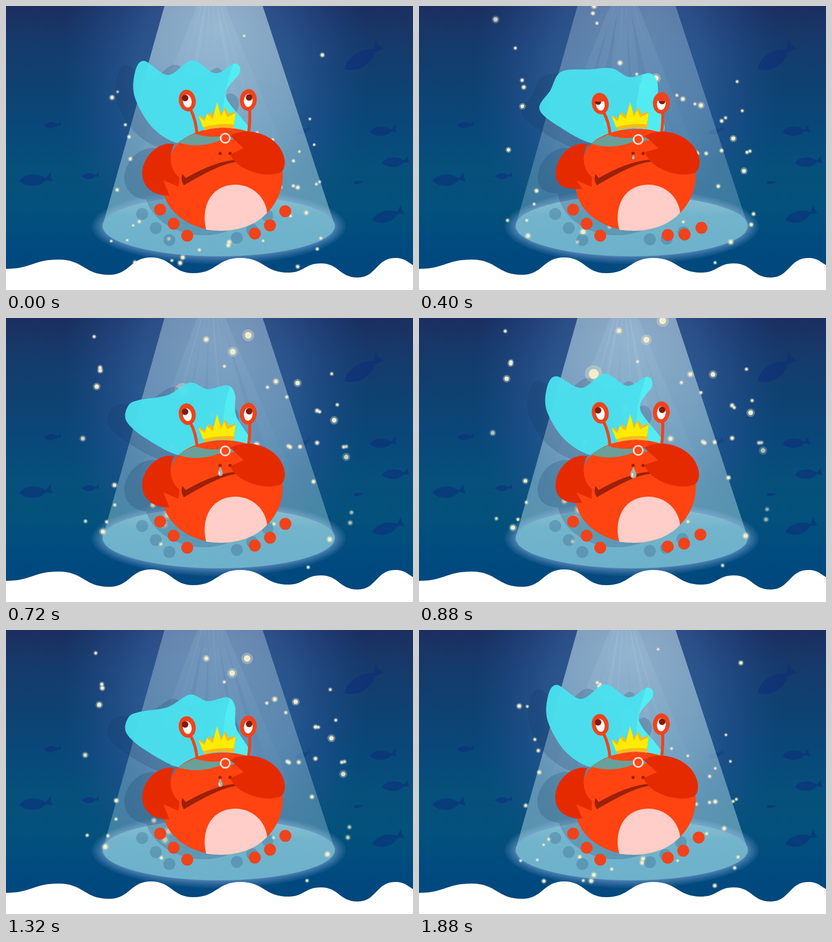
An HTML page with a canvas that plays this animation: 750 by 523 pixels, repeating every 1.92 s.

```html
<!DOCTYPE html>
<html lang="en">
<head>
<meta charset="utf-8">
<title>Crab under a spotlight</title>
<style>
  html, body { margin: 0; width: 100%; height: 100%; overflow: hidden; background: #004a80; }
  canvas { display: block; }
</style>
</head>
<body>
<canvas id="stage" width="750" height="523"></canvas>
<script>
const W = 750, H = 523, LOOP = 1920, STEP = 40;
const stage = document.getElementById('stage').getContext('2d');
const crabLayer = document.createElement('canvas');
crabLayer.width = W;
crabLayer.height = H;
const crab = crabLayer.getContext('2d');

const RED = '#ff4411', CLAW = '#e62a00', LIMB = '#f0431b', DARK = '#9c2108';
const VANISH = { x: 384, y: 668 };

const clamp = v => Math.min(1, Math.max(0, v));
const ease = v => clamp(v) ** 2 * (3 - 2 * clamp(v));
const bell = v => Math.exp(-v * v);

let seed = 11;
const random = (lo, hi) => {
  seed = seed * 16807 % 2147483647;
  return lo + (hi - lo) * seed / 2147483647;
};

// A speck is fixed in space; it is seen at x, y when the swing distance is d.
function speck(x, y, depth, d) {
  const z = depth + d * d;
  return { x: (x - VANISH.x) * z, y: (y - VANISH.y) * z, depth };
}

const bigSpecks = [
  [419, 40, 979], [449, 5, 848], [322, 103, 594], [634, 244, 1240], [602, 401, 1408],
  [173, 386, 1340], [196, 300, 1653], [169, 84, 1609], [581, 165, 2298], [523, 228, 1971]
].map(p => speck(...p, 2.5));
const specks = bigSpecks.concat(Array.from({ length: 46 }, () =>
  speck(random(135, 635), random(0, 470), random(1100, 2500), random(0, 24))));

function shape(c, path, fill) {
  c.fillStyle = fill;
  c.fill(typeof path === 'string' ? new Path2D(path) : path);
}

function oval(c, x, y, rx, ry, fill, turn = 0) {
  c.beginPath();
  c.ellipse(x, y, rx, ry, turn, 0, 7);
  c.fillStyle = fill;
  c.fill();
}

const dot = (c, x, y, r, fill) => oval(c, x, y, r, r, fill);

function fade(gradient, ...colors) {
  colors.forEach((color, i) => gradient.addColorStop(i / (colors.length - 1), color));
  return gradient;
}

const drop = (y0, y1, ...colors) => fade(stage.createLinearGradient(0, y0, 0, y1), ...colors);

function fish(x, y, size, turn = 0, alpha = .5) {
  stage.save();
  stage.translate(x, y);
  stage.rotate(turn);
  stage.scale(size / 60, size / 60);
  shape(stage, 'M-30 2 C-20-12 4-13 18-3 L28-15 C26-8 27-4 31 3 L18 1 C6 14-16 15-30 2Z',
    `rgba(13,42,122,${alpha})`);
  stage.restore();
}

function water() {
  stage.fillStyle = drop(0, H, '#1b2f60', '#153b6c', '#0e4271', '#09487a', '#06507b', '#03517c', '#004a80', '#00467a');
  stage.fillRect(0, 0, W, H);

  stage.save();
  stage.translate(384, 130);
  stage.scale(1, 1.35);
  stage.fillStyle = fade(stage.createRadialGradient(0, 0, 0, 0, 0, 285),
    'rgba(64,112,172,.62)', 'rgba(62,108,170,.6)', 'rgba(58,102,164,.56)', 'rgba(44,84,150,.36)', 'rgba(30,80,140,0)');
  stage.fillRect(-384, -130, W, H);
  stage.restore();

  fish(55, 320, 61);
  fish(86, 219, 32);
  fish(156, 313, 32);
  fish(695, 230, 50);
  fish(718, 287, 51);
  fish(704, 386, 60, -.22);
  fish(658, 95, 80, -.5);
  fish(649, 325, 18);
  fish(547, 230, 30, -.25, .3);
}

function spotlight(d, glow) {
  const cone = new Path2D('M292 0 H473 L606 405 A214 54 0 0 0 178 405Z');
  const a = .27 + .22 * glow;
  shape(stage, cone, drop(0, 405, `rgba(180,205,225,${a})`, `rgba(165,218,225,${a + .03})`));

  stage.save();
  stage.clip(cone);
  stage.fillStyle = fade(stage.createRadialGradient(390, 40, 0, 390, 40, 300),
    `rgba(205,235,240,${.1 + .26 * glow})`, 'rgba(205,235,240,0)');
  stage.fillRect(178, 0, 430, 405);
  stage.fillStyle = drop(0, 330, `rgba(195,225,245,${.1 + .03 * glow})`, 'rgba(195,225,245,0)');
  for (let i = -3; i <= 3; i++) {
    const top = 378 + i * 6;
    const foot = 380 + i * 46 + 9 * Math.sin(d / 4 + i * 2);
    const half = 9 + 7 * Math.abs(Math.sin(i * 2 + d / 9)) + 12 * glow;
    stage.beginPath();
    stage.moveTo(top - 4, -10);
    stage.lineTo(top + 4, -10);
    stage.lineTo(foot + half, 330);
    stage.lineTo(foot - half, 330);
    stage.fill();
  }
  stage.restore();

  for (let i = 7; i > 0; i--) {
    const r = 20 * (i / 7) ** 1.5;
    oval(stage, 392, 406, 214 + r, 55 + r * .7, 'rgba(170,198,238,.075)');
  }
  oval(stage, 392, 405, 214, 56, drop(350, 461, '#8abfd2', '#72b4cb', '#6fb2cb', '#6db1cb'));
}

function drawSpecks(d) {
  for (const s of specks) {
    const z = s.depth + d * d, r = 8400 / z;
    const x = VANISH.x + s.x / z, y = VANISH.y + s.y / z;
    stage.globalAlpha = clamp((285 - Math.abs(x - VANISH.x)) / 55);
    dot(stage, x, y, r * 1.15, 'rgba(225,225,195,.38)');
    dot(stage, x, y, r * .65, '#f3edcd');
  }
  stage.globalAlpha = 1;
}

// Cape outline from lower left over the top to lower right, blown up and hanging.
const raised = [[272, 226], [238, 170], [237, 125], [254, 101], [299, 127], [343, 100], [386, 124], [421, 106], [431, 122], [405, 166]];
const hanging = [[258, 222], [222, 190], [225, 162], [245, 151], [298, 142], [339, 119], [371, 131], [408, 124], [422, 141], [424, 180]];

function cape(d) {
  const lift = ease((Math.abs(d - 12) - 6) / 4.5);
  const gust = bell((d - 15.3) / 2);
  const edge = hanging.map(([x, y], i) => [
    x + (raised[i][0] - x) * lift + (i > 1 ? 20 * gust : 0),
    y + (raised[i][1] - y) * lift - 40 * gust * bell((i - 3.4) / 1.1)]);
  const points = [[324, 254], ...edge, [450, 232], [390, 242]];
  const n = points.length, at = i => points[(i + n) % n];

  const path = new Path2D();
  path.moveTo(...at(0));
  for (let i = 0; i < n; i++) {
    const [p, q, r, s] = [at(i - 1), at(i), at(i + 1), at(i + 2)];
    path.bezierCurveTo(q[0] + (r[0] - p[0]) / 6, q[1] + (r[1] - p[1]) / 6,
      r[0] - (s[0] - q[0]) / 6, r[1] - (s[1] - q[1]) / 6, ...r);
  }
  crab.globalAlpha = .96;
  shape(crab, path, '#4ae1ef');
  crab.save();
  crab.clip(path);
  shape(crab, 'M424 90 C412 130 396 160 400 240 H470 V90Z', 'rgba(90,250,246,.5)');
  crab.restore();
  crab.globalAlpha = 1;
}

function eye(x, y, tilt, look, lid) {
  oval(crab, x, y, 15.5, 20, LIMB, tilt);
  crab.save();
  crab.beginPath();
  crab.rect(x - 16, y - 11 + 24 * lid, 32, 40);
  crab.clip();
  oval(crab, x, y + 1, 8, 12, '#fff', tilt);
  dot(crab, x + look, y - 4.5 + 3 * lid, 6, '#7d1c0a');
  crab.restore();
}

function crown() {
  shape(crab, 'M355 201 L367 207 L373 195 L381 202 L389 179 L397 199 L404 187 L411 199 L423 194 L420 226 Q393 221 366 229Z', '#fbb91c');
  shape(crab, 'M355 203 L366 212 L370 199 L381 208 L389 177 L396 204 L402 192 L408 205 L423 197 L420 218 Q393 215 363 223Z', '#ffec00');
}

function feet(tap) {
  for (let i = 0; i < 3; i++) {
    dot(crab, 284 + 25 * i, 375 + 28 * i - 2 * i * i, 11, LIMB);
    dot(crab, 458.5 + 28 * i + 3.2 * i * tap, 419 - 9.5 * i - 5.5 * i * i + (3 + 15 * i) * tap, 11, LIMB);
  }
}

function drawTear(size) {
  if (size < .06) return;
  crab.save();
  crab.translate(395, 273);
  crab.scale(size, size);
  shape(crab, 'M0 0 C2 8 7 12 6 18 C5 26-5 26-6 18 C-7 12-2 8 0 0Z', '#a9b1a4');
  oval(crab, -2, 17, 1.8, 4, '#e6e8df');
  crab.restore();
}

function drawCrab(d, bob, tap) {
  crab.clearRect(0, 0, W, H);
  cape(d);
  feet(tap);

  const top = 224 + bob * .35;
  shape(crab, `M303 285 C303 249 350 ${top} 403 ${top} C470 ${top + 2} 510 265 510 312 C510 368 462 414 397 414 C338 414 288 375 289 330Z`, RED);
  shape(crab, 'M369 412 C360 380 370 330 423 329 C463 330 480 362 481 381 C462 402 430 414 397 414 Q382 414 369 412Z', '#ffcec8');

  crab.lineWidth = 5.5;
  crab.strokeStyle = LIMB;
  crab.stroke(new Path2D(`M340 ${190 + bob} Q350 ${210 + bob / 2} 352 236 M449 ${189 + bob} Q450 212 447 234`));
  crown();

  crab.save();
  crab.translate(0, bob * .4);
  shape(crab, 'M317 251 Q331 241 348 235 C362 240 382 242 397 240 L396 247 C375 256 345 261 317 251Z M411 239 L430 244 L411 247Z', '#6b9f99');
  dot(crab, 404, 243.5, 10, '#f9ddd2');
  dot(crab, 404, 243.5, 7, '#ff4718');
  crab.restore();

  dot(crab, 394.5, 271.5, 3, DARK);
  dot(crab, 413, 271.5, 3, DARK);
  shape(crab, 'M325 309 L331 317 C357 302 395 284 428 283 L426 287 C396 290 360 312 328 330 C323 323 323 316 325 309Z', DARK);
  drawTear(1.05 - d / 22);

  const tip = 349 - 13 * tap, side = 251 + tap;
  shape(crab, `M310 254 C277 249 ${side} 281 ${side} 308 C${side} 334 272 ${tip + 1} 301 ${tip} L290 321 L318 333 L319 315 C302 302 299 275 310 254Z`, CLAW);
  crab.save();
  crab.translate(3.5 * tap, 0);
  shape(crab, `M413 239 C435 226 475 228 500 255 C518 276 517 301 505 307 C476 318 424 301 413 ${273 - 4 * tap} L438 262Z`, CLAW);
  crab.restore();

  const blink = c => clamp(1 - Math.abs(d - c) / 3);
  const lid = Math.max(blink(12.4), blink(18.9));
  eye(334, 174 + bob, -.18, -4, lid);
  eye(446.5, 173 + bob, .08, 1.5, lid);
}

function foam() {
  const crest = [[0, 484], [97, 467], [190, 495], [267, 463], [345, 492], [432, 464],
    [520, 491], [580, 474], [648, 500], [717, 464], [770, 482]];
  stage.beginPath();
  stage.moveTo(...crest[0]);
  crest.slice(1).forEach(([x, y], i) => {
    const [px, py] = crest[i], mid = (px + x) / 2;
    stage.bezierCurveTo(mid, py, mid, y, x, y);
  });
  stage.lineTo(W + 20, H);
  stage.lineTo(0, H);
  stage.fillStyle = '#fff';
  stage.fill();
}

function frame(now) {
  // The whole scene swings forth and back around the middle of the loop.
  const d = Math.abs(Math.floor(now % LOOP / STEP) - 24.5);
  const sway = Math.sin(Math.PI * d / 25) ** 2;
  const tap = (1 - Math.cos(2 * Math.PI * (24.5 - d) / 17)) / 2;

  water();
  spotlight(d, 1 - sway);
  drawSpecks(d);
  drawCrab(d, 6 * sway, tap);
  stage.save();
  stage.shadowColor = 'rgba(20,50,95,.2)';
  stage.shadowOffsetX = -33;
  stage.shadowOffsetY = 8;
  stage.drawImage(crabLayer, 0, 0);
  stage.restore();
  foam();
  requestAnimationFrame(frame);
}
requestAnimationFrame(frame);
</script>
</body>
</html>
```
